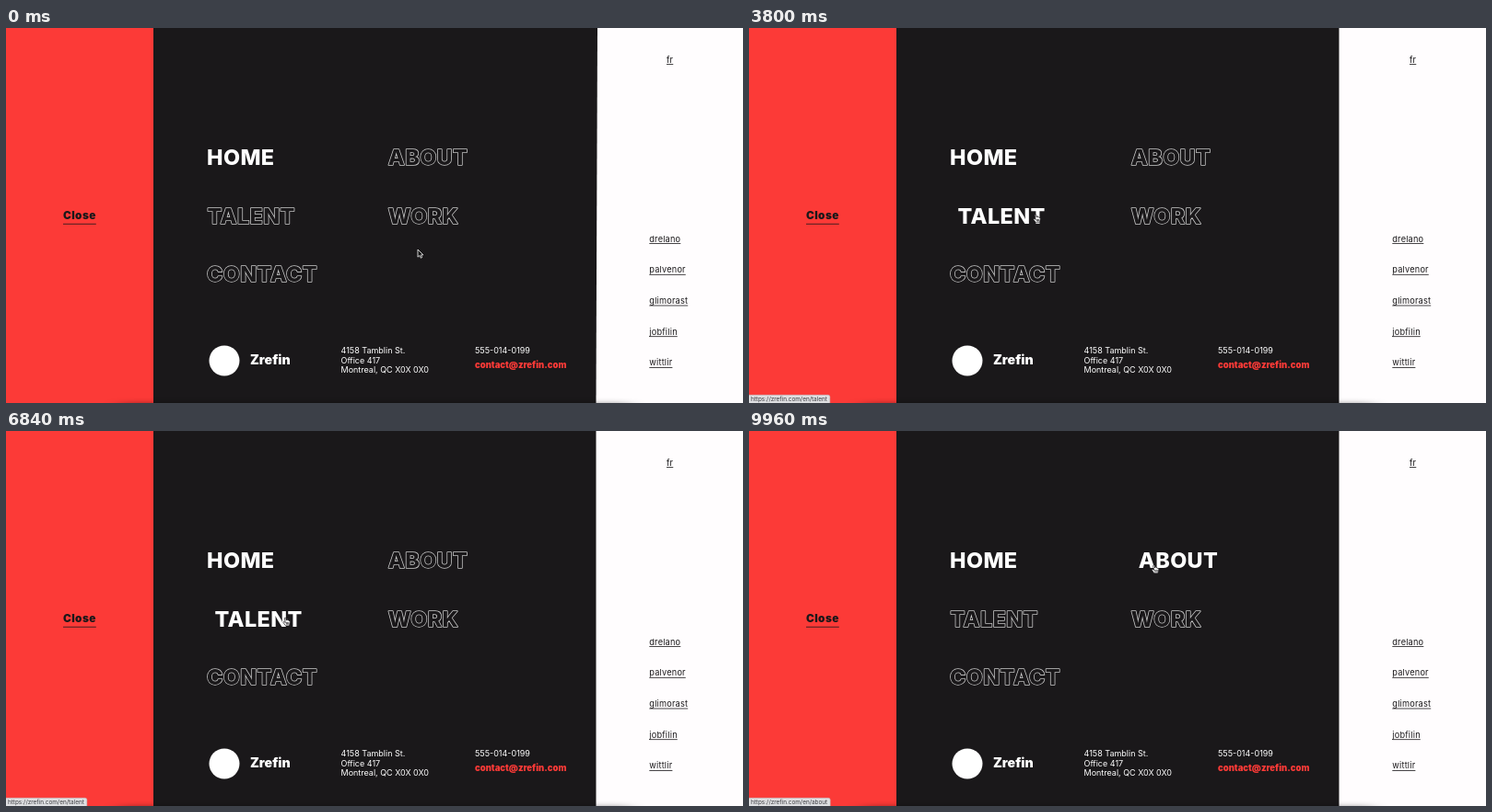
Animation of 800 by 408 pixels, one loop 10000 ms. Source, as an HTML page:

```html
<!DOCTYPE html>
<html lang="en">
<head>
<meta charset="utf-8">
<title>Menu hover</title>
<style>
  html, body { margin: 0; width: 100%; height: 100%; overflow: hidden; background: #1a181a; }
  svg { display: block; width: 100vw; height: 100vh; font-family: Inter, "Liberation Sans", sans-serif; }
  .menu { font-size: 23.4px; font-weight: 800; letter-spacing: .4px; paint-order: stroke; stroke-width: 1.5; stroke-linejoin: round; }
  .small { font-size: 9px; fill: #fff; }
  .link { font-size: 9.2px; letter-spacing: .2px; fill: #1a181a; }
  .close { font-size: 11.8px; font-weight: 900; letter-spacing: .4px; fill: #1a181a; }
</style>
</head>
<body>
<svg id="stage" viewBox="0 0 800 408" preserveAspectRatio="none">
  <defs>
    <filter id="soft" x="-20%" y="-300%" width="140%" height="700%"><feGaussianBlur stdDeviation="10 3"/></filter>
  </defs>
  <rect width="160" height="408" fill="#fc3a37"/>
  <rect x="640" width="160" height="408" fill="#fffdfe"/>
  <polygon id="panel" fill="#1a181a"/>
  <rect x="124" y="409" width="552" height="10" opacity=".5" filter="url(#soft)"/>

  <g id="links"></g>
  <g id="menu"></g>

  <circle cx="237" cy="362" r="16.5" fill="#fff"/>
  <text x="265" y="366" font-size="14.2" font-weight="900" fill="#fff">Zrefin</text>
  <g class="small">
    <text x="363.5" y="354">4158 Tamblin St.</text>
    <text x="363.5" y="364.5">Office 417</text>
    <text x="363.5" y="375">Montreal, QC X0X 0X0</text>
    <text x="509" y="354">555-014-0199</text>
  </g>
  <text x="509" y="369.5" font-size="9.5" font-weight="900" fill="#fc3a37">contact@zrefin.com</text>

  <g id="status">
    <path id="statusBox" fill="#dfe0e2" stroke="#b9b9bb" stroke-width=".5"/>
    <text id="statusText" x="2" y="406.2" font-size="6.4" fill="#3c3c40"></text>
  </g>

  <path id="arrow" d="M0 0V8.2L1.9 6.5 3.2 9.2 4.6 8.6 3.4 5.9H5.9Z" fill="#111" stroke="#fff" stroke-width=".8" stroke-linejoin="round"/>
  <g id="hand" stroke="#1a181a" stroke-width=".7" stroke-linejoin="round" stroke-linecap="round">
    <path d="M-.7 .3Q0-.5 .7 .3L1.1 3Q2-.1 2.7 2.9 3.6 2.2 4 3.4 5.2 3 5.3 4.6L4.8 7.2 4.2 8.8H.4L-2.2 5.3Q-2.3 4-.9 4.7L-.1 5.2Z" fill="#fff"/>
    <path d="M1.3 5.3V7.2M2.5 5.3V7.2M3.7 5.3V7.2" fill="none"/>
  </g>
</svg>
<script>
const LOOP = 10000, HOVER_MS = 300, SHIFT = 8;
const $ = id => document.getElementById(id);

function add(parent, tag, attrs, text) {
  const el = document.createElementNS("http://www.w3.org/2000/svg", tag);
  for (const key in attrs) el.setAttribute(key, attrs[key]);
  if (text) el.textContent = text;
  return parent.appendChild(el);
}

function underlined(text, cls, x, y, gap) {
  const label = add($("links"), "text", { x, y, class: cls }, text);
  add($("links"), "rect", {
    x, y: y + gap, width: label.getComputedTextLength(), height: .8, fill: "#1a181a"
  });
}

underlined("Close", "close", 62, 208.2, 4.6);
underlined("fr", "link", 717, 37.5, 1.7);
["drelano", "palvenor", "glimorast", "jobfilin", "wittlir"]
  .forEach((name, i) => underlined(name, "link", 698.3, 232.5 + 33.7 * i, 1.7));

const items = {
  home:    { label: "HOME",    x: 218, y: 149 },
  about:   { label: "ABOUT",   x: 414.8, y: 149, path: "about" },
  talent:  { label: "TALENT",  x: 218.4, y: 212.6, path: "talent" },
  work:    { label: "WORK",    x: 414.8, y: 212.6, path: "projects" },
  contact: { label: "CONTACT", x: 218, y: 276, path: "contact" }
};
for (const item of Object.values(items)) {
  item.el = add($("menu"), "text", { class: "menu", x: item.x, y: item.y }, item.label);
  item.width = item.el.getComputedTextLength();
}

// [start ms, hovered item]
const hovers = [
  [0, ""], [480, "work"], [1240, ""], [1440, "about"], [3040, "talent"], [4280, "contact"],
  [6240, "talent"], [7640, "work"], [8980, ""], [9240, "about"]
];

// [ms, x, y] of the pointer tip
const route = [
  [0, 447, 241], [250, 447, 240], [640, 444, 206], [1080, 443, 202], [1500, 438, 147],
  [2120, 437, 146], [2320, 438, 146], [2640, 438, 146], [3200, 300, 206], [3800, 311, 203],
  [4050, 309, 205], [4480, 296, 268], [5000, 304, 266], [5560, 302, 268], [5720, 302, 268],
  [6050, 304, 262], [6200, 306, 230], [6360, 306, 206], [6900, 303, 203], [7360, 310, 204],
  [7600, 410, 199], [7760, 434, 203], [8100, 432, 205], [8480, 428, 201], [8840, 430, 202],
  [9340, 438, 147], [9960, 439.5, 146], [LOOP, 439.5, 146]
];

const smooth = p => { p = Math.min(1, Math.max(0, p)); return p * p * (3 - 2 * p); };
const mix = (a, b, p) => a + (b - a) * p;

function pointerAt(t) {
  const i = route.findIndex(stop => stop[0] > t);
  const a = route[i - 1], b = route[i], p = smooth((t - a[0]) / (b[0] - a[0]));
  return [mix(a[1], b[1], p), mix(a[2], b[2], p)];
}

function hoverAmount(name, t) {
  if (name === "home") return 1;
  return hovers.reduce((sum, [start, hovered], i) => {
    if (hovered !== name) return sum;
    const end = i + 1 < hovers.length ? hovers[i + 1][0] : Infinity;
    return sum + smooth((t - start) / HOVER_MS) - smooth((t - end) / HOVER_MS);
  }, 0);
}

function drawStatus(name) {
  $("status").style.display = name ? "" : "none";
  if (!name) return;
  $("statusText").textContent = "https://zrefin.com/en/" + items[name].path;
  const right = $("statusText").getComputedTextLength() + 5;
  $("statusBox").setAttribute("d", `M-1 399.3H${right - 2}q2 0 2 2V409H-1Z`);
}

function drawPointer(t) {
  const [x, y] = pointerAt(t);
  const overLink = Object.values(items).some(item =>
    x >= item.x && x <= item.x + item.width + SHIFT && y > item.y - 20 && y < item.y + 4);
  for (const id of ["arrow", "hand"]) {
    $(id).setAttribute("transform", `translate(${x} ${y})`);
    $(id).style.display = (id === "hand") === overLink ? "" : "none";
  }
}

function draw(t) {
  const slant = 1.5 * (1 - smooth(t / 400));
  $("panel").setAttribute("points", `160,0 ${640.5 + slant},0 640.5,408 160,408`);
  for (const [name, item] of Object.entries(items)) {
    const p = hoverAmount(name, t);
    const shift = name === "home" ? 0 : SHIFT * p;
    item.el.setAttribute("transform", `translate(${shift} 0)`);
    item.el.setAttribute("fill", `rgb(${mix(26, 255, p)},${mix(24, 255, p)},${mix(26, 255, p)})`);
    item.el.setAttribute("stroke", `rgba(205,205,205,${1 - p})`);
  }
  drawStatus(hovers.filter(h => h[0] <= t).pop()[1]);
  drawPointer(t);
}

function frame() {
  draw(performance.now() % LOOP);
  requestAnimationFrame(frame);
}
frame();
</script>
</body>
</html>
```
